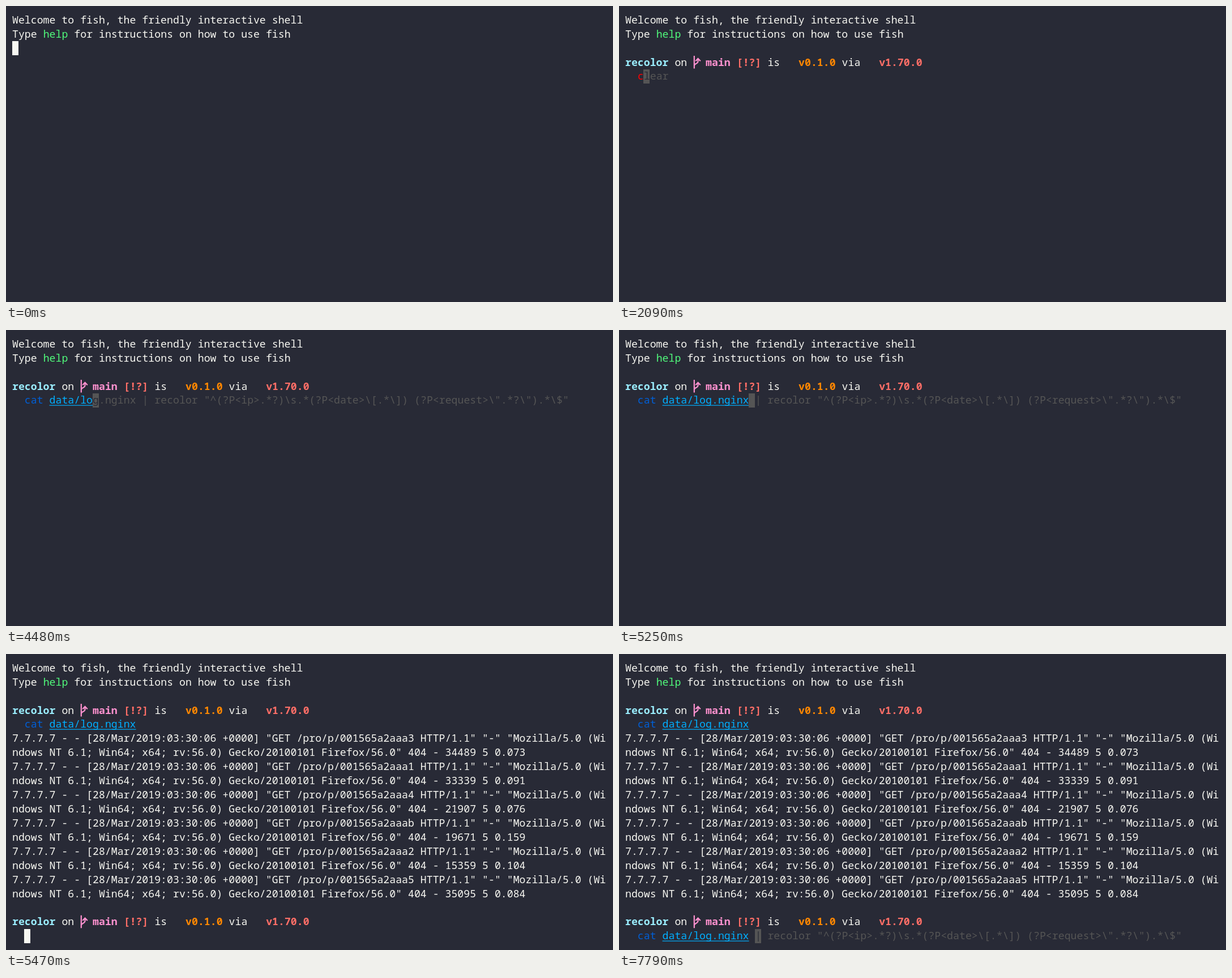
An HTML page with a canvas that plays this animation: 1072 by 523 pixels, repeating every 8 s.

```html
<!DOCTYPE html>
<html lang="en">
<head>
<meta charset="utf-8">
<title>Terminal session</title>
<style>
  html, body { margin: 0; width: 100%; height: 100%; overflow: hidden; background: #282a36; }
  canvas { display: block; }
</style>
</head>
<body>
<canvas id="screen" width="1072" height="523"></canvas>
<script>
const ctx = document.getElementById('screen').getContext('2d');
const LOOP = 8000, COLS = 96, CELL = 10.93, LINE = 24.92, LEFT = 11, TOP = 12.3;
const BG = '#282a36', FG = '#f8f8f2', GRAY = '#555555', RED = '#ff6e67', PINK = '#ff92d0';
const COMMAND = String.raw`cat data/log.nginx | recolor "^(?P<ip>.*?)\s.*(?P<date>\[.*\]) (?P<request>\".*?\").*\$"`;
const FILE_END = 18;

// [time, number of characters typed]
const KEYS = [
  [350, 0], [2090, 1], [2590, 3], [2720, 4], [3500, 5], [3590, 7], [3780, 8], [4140, 9],
  [4330, 10], [4480, 11], [4560, 12], [4700, 13], [4880, 14], [4970, 15], [5060, 16],
  [5150, 17], [5250, 18]
];

const LOG = [
  ['3', '34489 5 0.073'], ['1', '33339 5 0.091'], ['4', '21907 5 0.076'],
  ['b', '19671 5 0.159'], ['2', '15359 5 0.104'], ['5', '35095 5 0.084']
].flatMap(([id, stats]) => {
  const line = `7.7.7.7 - - [28/Mar/2019:03:30:06 +0000] "GET /pro/p/001565a2aaa${id} HTTP/1.1" "-" ` +
    `"Mozilla/5.0 (Windows NT 6.1; Win64; x64; rv:56.0) Gecko/20100101 Firefox/56.0" 404 - ${stats}`;
  return [line.slice(0, COLS), line.slice(COLS)];
});

const colX = col => LEFT + col * CELL;
const rowY = row => TOP + row * LINE;

function text(str, col, row, color = FG, bold = false) {
  ctx.font = `${bold ? 'bold ' : ''}18.22px "Noto Sans Mono", "DejaVu Sans Mono", monospace`;
  ctx.fillStyle = color;
  ctx.fillText(str, colX(col), rowY(row) + 18.5);
}

function cursor(col, row, color = FG) {
  const x = Math.floor(colX(col)), y = Math.round(rowY(row));
  ctx.fillStyle = color;
  ctx.fillRect(x, y, 11, 25);
}

function branchIcon(col, row) {
  ctx.save();
  ctx.translate(colX(col), rowY(row));
  ctx.strokeStyle = PINK;
  ctx.lineWidth = 2.2;
  ctx.stroke(new Path2D('M1.6 1V23.5M1.6 18.5C2.5 13.5 8.3 16 8.3 10.5V6M4 10.2L8.3 5.8L12.6 10.2'));
  ctx.restore();
}

function prompt(row) {
  text('recolor', 0, row, '#9aedfe', true);
  text('on', 8, row);
  branchIcon(11, row);
  text('main', 13, row, PINK, true);
  text('[!?]', 18, row, RED, true);
  text('is', 23, row);
  text('v0.1.0', 28, row, '#ff8700', true);
  text('via', 35, row);
  text('v1.70.0', 41, row, RED, true);
}

function typed(count, row) {
  text(COMMAND.slice(0, Math.min(count, 3)), 2, row, count < 3 ? '#ff0000' : '#005fd7');
  const end = Math.min(count, FILE_END);
  if (end > 4) {
    text(COMMAND.slice(4, end), 6, row, '#00afff');
    ctx.fillRect(colX(6), Math.round(rowY(row)) + 20.5, (end - 4) * CELL, 1.2);
  }
}

function suggestion(full, count, row) {
  cursor(count + 2, row, GRAY);
  text(full[count], count + 2, row, BG);
  text(full.slice(count + 1), count + 3, row, GRAY);
}

function draw(t) {
  ctx.fillStyle = BG;
  ctx.fillRect(0, 0, 1072, 523);
  text('Welcome to fish, the friendly interactive shell', 0, 0);
  text('Type', 0, 1);
  text('help', 5, 1, '#50fa7b');
  text('for instructions on how to use fish', 10, 1);
  if (t < 350) return cursor(0, 2);

  prompt(3);
  const count = KEYS.findLast(([time]) => time <= t)[1];
  typed(count, 4);
  if (t < 5380) {
    if (count) suggestion(count === 1 ? 'clear' : COMMAND, count, 4);
    else cursor(2, 4);
    return;
  }

  LOG.forEach((line, i) => text(line, 0, 5 + i));
  if (t < 5470) return cursor(0, 17);

  prompt(18);
  if (t < 7520) return cursor(2, 19);
  typed(FILE_END, 19);
  if (t < 7790) cursor(FILE_END + 2, 19);
  else suggestion(COMMAND, FILE_END + 1, 19);
}

const start = performance.now();
function tick() {
  draw((performance.now() - start) % LOOP);
  requestAnimationFrame(tick);
}
tick();
</script>
</body>
</html>
```
